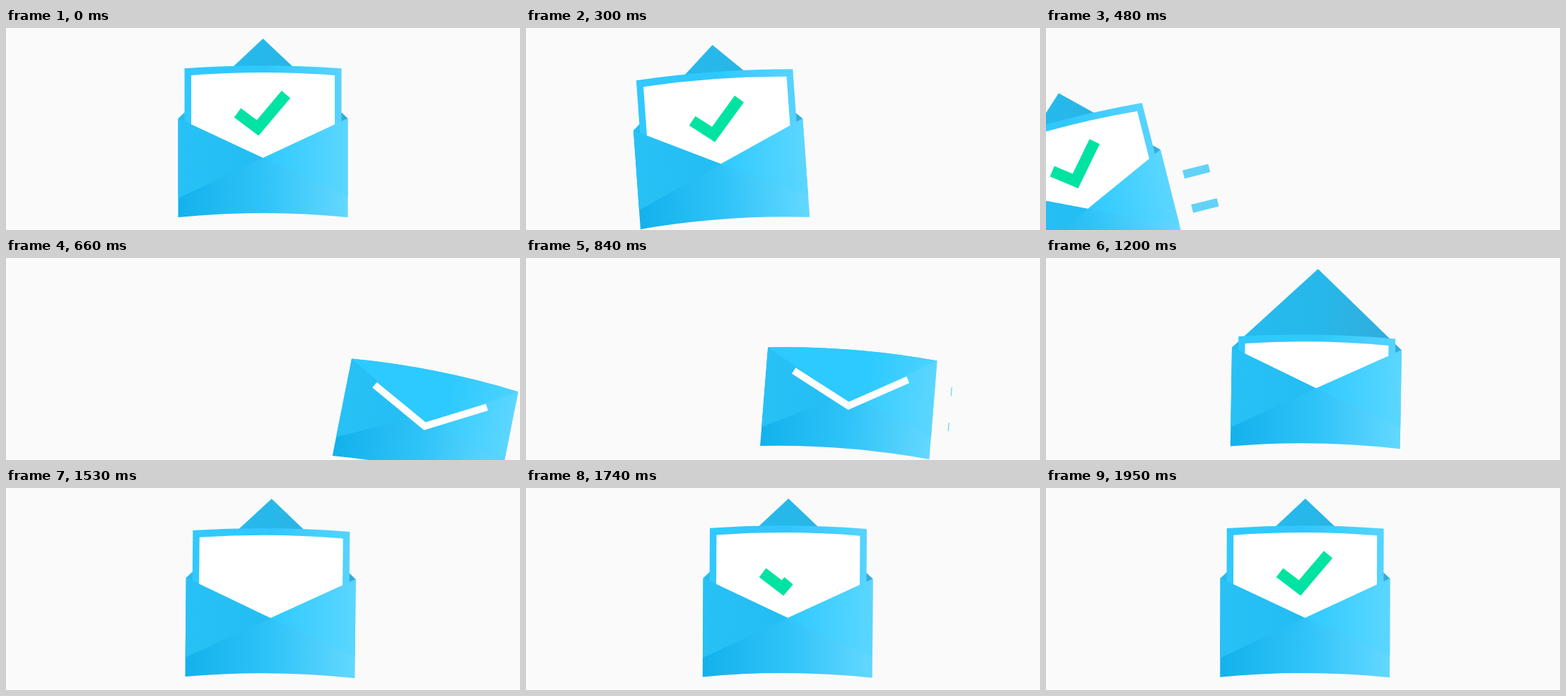
Recreate the animation shown at these times as an HTML page with a canvas. Size 727 by 286 pixels, loop 1980 ms.

```html
<!DOCTYPE html>
<html lang="en">
<head>
<meta charset="utf-8">
<title>Envelope</title>
<style>
  html, body { margin: 0; width: 100%; height: 100%; overflow: hidden; background: #fafafa; }
  canvas { display: block; }
</style>
</head>
<body>
<canvas id="stage" width="727" height="286"></canvas>
<script>
const ctx = document.getElementById('stage').getContext('2d');
const LOOP = 1980, STEPS = 55;
const CX = 363.5, LEFT = 243.5, RIGHT = 483.5, TOP = 128, BASE = 268, NOTCH = 184;

const clamp = v => Math.max(0, Math.min(1, v));
const easeInOut = u => (1 - Math.cos(Math.PI * clamp(u))) / 2;

function gradient(...stops) {
  const g = ctx.createLinearGradient(LEFT, 0, RIGHT, 0);
  stops.forEach(([at, color]) => g.addColorStop(at, color));
  return g;
}

const paint = {
  back: gradient([0, '#25bbef'], [.5, '#27b8ea'], [1, '#32abda']),
  left: gradient([0, '#28c1f6'], [.5, '#24bdf3']),
  right: gradient([.5, '#2ecaff'], [1, '#5bd6ff']),
  bottom: gradient([0, '#13b1ec'], [.5, '#2fc3f8'], [1, '#63d8ff']),
  flap: gradient([0, '#2dcaff'], [.6, '#2dcaff'], [1, '#4dd2ff']),
  border: gradient([0, '#31c9ff'], [.5, '#2fc8fc'], [1, '#5ad4ff']),
  trail: '#62d3f6',
  check: '#00e3a2'
};

function fill(path, color) {
  ctx.fillStyle = color;
  ctx.fill(new Path2D(path));
}

function stroke(path, color, width) {
  ctx.strokeStyle = color;
  ctx.lineWidth = width;
  ctx.stroke(new Path2D(path));
}

// Sheet with an arched top; its lower end stays behind the front panels.
function sheet(x0, x1, y, color) {
  fill(`M${x0} ${y}Q${CX} ${y - 8} ${x1} ${y}V190H${x0}Z`, color);
}

function drawPaper(drop) {
  if (drop > 120) return;
  ctx.save();
  ctx.beginPath();
  ctx.moveTo(LEFT, 0);
  ctx.lineTo(RIGHT, 0);
  ctx.lineTo(RIGHT, TOP + 2);
  ctx.lineTo(CX, NOTCH + 2);
  ctx.lineTo(LEFT, TOP + 2);
  ctx.clip();
  sheet(252.5, 474.5, 57.3 + drop, paint.border);
  sheet(262, 465, 67 + drop, '#fff');
  ctx.restore();
}

function drawFront() {
  const floor = `V${BASE}Q${CX} 256 ${LEFT} ${BASE}Z`;
  fill(`M${LEFT} ${TOP}L${CX} ${NOTCH}L${RIGHT} ${TOP}${floor}`, paint.bottom);
  fill(`M${LEFT} ${TOP}L${CX} ${NOTCH}L${LEFT} 241Z`, paint.left);
  fill(`M${RIGHT} ${TOP}L${CX} ${NOTCH}L${RIGHT} 238Z`, paint.right);
}

function drawFlap(tip) {
  fill(`M${LEFT} ${TOP}Q${CX} 116 ${RIGHT} ${TOP}L${CX} ${tip}Z`, paint.flap);
  const s = (tip - TOP) / 69;
  const end = TOP + 30 * s;
  stroke(`M282.5 ${end}L${CX} ${TOP + 73.5 * s}L444.5 ${end}`, '#fff', 10 * Math.sqrt(s));
}

function drawCheck(part) {
  if (part <= 0) return;
  ctx.setLineDash([98 * part, 200]);
  stroke('M327.5 120L356 141.5L396 94', paint.check, 16);
  ctx.setLineDash([]);
}

function drawTrail(width) {
  ctx.fillStyle = paint.trail;
  for (const y of [164, 214]) ctx.fillRect(RIGHT + 23, y, width, 12);
}

function drawEnvelope({ dx, dy, turn, tip, drop, check, trail }) {
  ctx.save();
  ctx.translate(CX + dx, BASE + dy);
  ctx.rotate(turn * Math.PI / 180);
  ctx.translate(-CX, -BASE);
  const open = tip < TOP;
  fill(`M${LEFT} ${TOP}Q${CX} 116 ${RIGHT} ${TOP}L${CX} ${NOTCH + 4}Z`, paint.back);
  if (open) {
    fill(`M${LEFT} ${TOP}L${CX} ${tip}L${RIGHT} ${TOP}L${CX} ${NOTCH}Z`, paint.back);
    drawPaper(drop);
  }
  drawFront();
  if (!open) drawFlap(tip);
  drawCheck(check);
  if (trail > 0) drawTrail(trail);
  ctx.restore();
}

function leaving(k) {
  const dx = -16.5 * (1.25 ** k - 1);
  return {
    dx, dy: .0047 * Math.abs(dx) ** 1.7, turn: dx / 20,
    tip: 15, drop: 0, check: 1,
    trail: k > 8 ? 1.5 * (k - 8) ** 2 : 0
  };
}

// Fast entry that decays into a slow drift towards the centre.
function arriving(k) {
  const n = k - 18;
  const decay = n < 0 ? .213 * n : .1678 * n + .0091 * n * n;
  const dx = 191.6 * Math.exp(-decay) + .6 * (58.5 - k);
  return {
    dx, dy: .0038 * dx ** 1.7, turn: dx / 19.2,
    tip: 197 - 182 * easeInOut((k - 25) / 6.3),
    drop: k > 45 ? 0 : 55 * .736 ** (k - 33),
    check: easeInOut((k - 44) / 8),
    trail: k < 24 ? 1.2 * (24 - k) ** 2.2 : 0
  };
}

// Five poses every 180 ms; the first of them is held twice as long.
function stepAt(t) {
  const beat = Math.floor(t / 180);
  const slot = Math.floor((t % 180) / 30);
  return (beat * 5 + Math.max(0, slot - 1)) % STEPS;
}

const start = performance.now();

function render(now) {
  const k = stepAt(Math.max(0, now - start) % LOOP);
  ctx.fillStyle = '#fafafa';
  ctx.fillRect(0, 0, 727, 286);
  if (k < 17) drawEnvelope(leaving(k));
  if (k > 13) drawEnvelope(arriving(k));
  requestAnimationFrame(render);
}

render(start);
</script>
</body>
</html>
```
